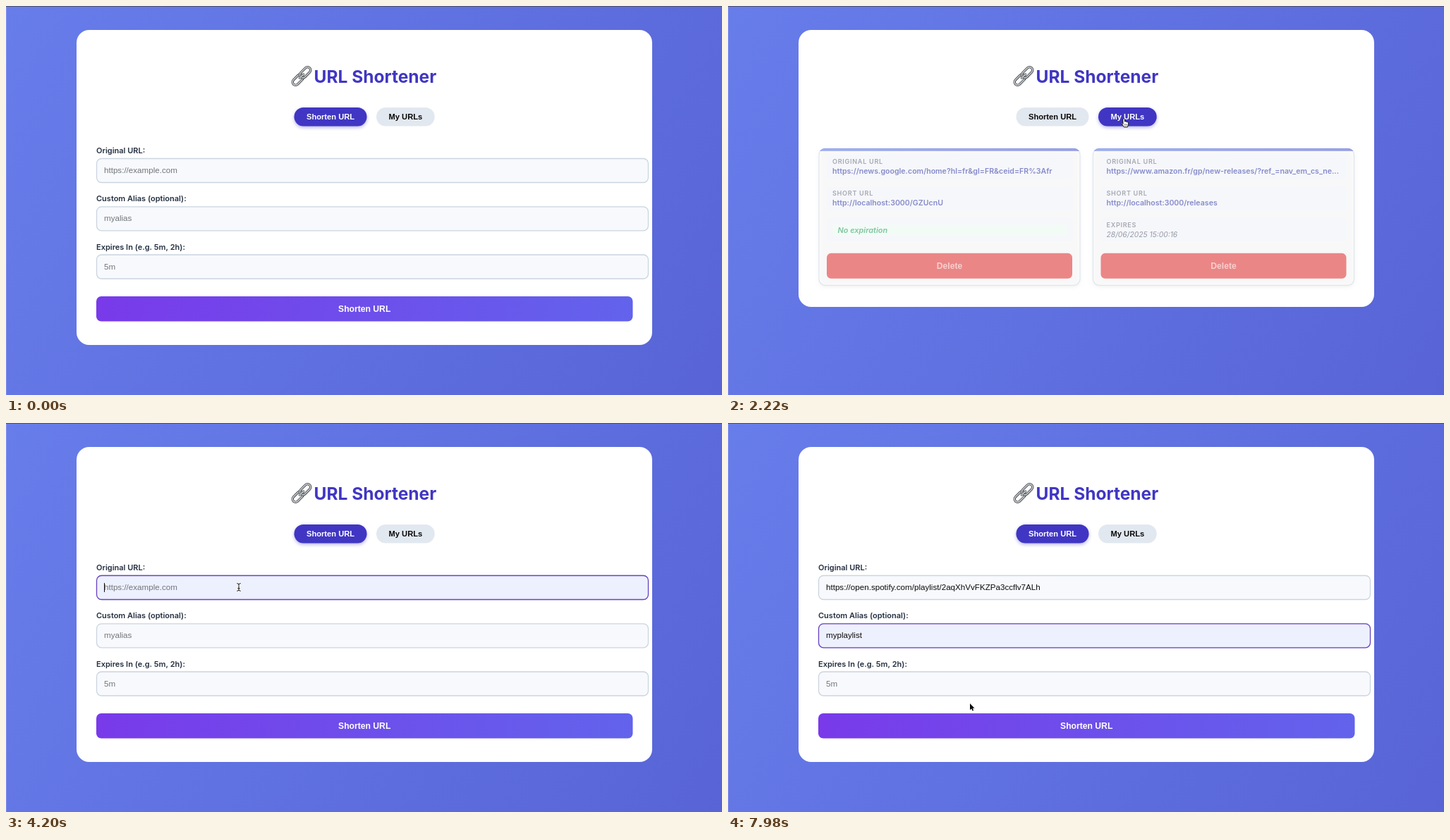
Animation of 1015x552 px, one loop 8 s. Source, as an HTML page with a canvas:

```html
<!DOCTYPE html>
<html lang="en">
<head>
<meta charset="utf-8">
<title>URL Shortener</title>
<style>
  html, body { margin: 0; width: 100%; height: 100%; overflow: hidden; background: #606fe0; }
  canvas { display: block; width: 1015px; height: 552px; }
</style>
</head>
<body>
<canvas id="stage" width="1015" height="552"></canvas>
<script>
const ctx = document.getElementById('stage').getContext('2d');
const LOOP = 8000, STEP = 30;
const SANS = '"Liberation Sans", Arial, sans-serif';
const UI = 'Inter, sans-serif';
const INPUT_FONT = `11.62px ${SANS}`;

const LINK = 'https://open.spotify.com/playlist/2aqXhVvFKZPa3ccflv7ALh';
const ALIAS = 'myplaylist';
const KEY_TIMES = [5610, 5790, 5940, 6000, 6150, 6300, 6750, 6870, 6960, 7170];
const PASTE = 4470, LIST_IN = 1860, LIST_OUT = 3210;
const CLICKS = [1350, 1800, 3210, 4020, 5160];

// Pointer hot spot: time, x, y
const PATH = [
  [30, 582, 545], [330, 556, 112], [390, 552, 95], [480, 550, 119],
  [660, 550, 119], [900, 556, 157], [1170, 556, 157], [1320, 570, 231],
  [1410, 570, 231], [1620, 567, 160], [2190, 567, 160], [2580, 492, 154],
  [2730, 487, 154], [3000, 486, 154], [3480, 486, 154], [3960, 330, 233],
  [4680, 330, 233], [4980, 324, 300.5], [7200, 324, 300.5],
  [7950, 336, 391.5], [7980, 343, 398]
];

const clamp = v => Math.max(0, Math.min(1, v));
const ramp = (t, from, to) => clamp((t - from) / (to - from));
const smooth = p => p * p * (3 - 2 * p);
const mix = (a, b, p) => a + (b - a) * p;

function box(x, y, w, h, r, fill, stroke, line = 1.3) {
  ctx.beginPath();
  ctx.roundRect(x, y, w, h, r);
  if (fill) { ctx.fillStyle = fill; ctx.fill(); }
  if (stroke) { ctx.strokeStyle = stroke; ctx.lineWidth = line; ctx.stroke(); }
}

function label(str, x, y, font, color, align = 'left', spacing = 0) {
  ctx.font = font;
  ctx.fillStyle = color;
  ctx.textAlign = align;
  ctx.letterSpacing = spacing + 'px';
  ctx.fillText(str, x, y);
  ctx.letterSpacing = '0px';
}

function gradient(x0, y0, x1, y1, from, to) {
  const g = ctx.createLinearGradient(x0, y0, x1, y1);
  g.addColorStop(0, from);
  g.addColorStop(1, to);
  return g;
}

function layer(alpha, draw) {
  if (alpha <= 0) return;
  ctx.save();
  ctx.globalAlpha *= alpha;
  draw();
  ctx.restore();
}

function shadow(color, blur, dy, draw) {
  ctx.save();
  ctx.shadowColor = color;
  ctx.shadowBlur = blur;
  ctx.shadowOffsetY = dy;
  draw();
  ctx.restore();
}

function drawBackground() {
  ctx.fillStyle = gradient(0, 0, 982, 612, '#677dea', '#5864d6');
  ctx.fillRect(0, 0, 1015, 552);
  ctx.fillStyle = 'rgba(255,255,255,.18)';
  ctx.fillRect(0, 0, 1, 552);
  ctx.fillStyle = '#4b4f6c';
  ctx.fillRect(0, 0, 1015, 1);
}

function drawChain() {
  ctx.save();
  ctx.translate(419, 99.5);
  ctx.rotate(-Math.PI / 4);
  for (const x of [-16.3, -1.7]) {
    box(x, -4.3, 18, 8.6, 4.3, null, '#3f4246', 3.4);
    box(x, -4.3, 18, 8.6, 4.3, null, '#a9adb1', 1.9);
    box(x, -4.6, 18, 8.6, 4.3, null, '#e4e6e8', 0.7);
  }
  box(-5, -1.2, 10, 2.4, 1.2, '#c6c9cc', '#45484c', 0.8);
  ctx.restore();
}

function drawTab(str, x, w, active) {
  const textX = x + w / 2;
  const font = `bold 11.13px ${SANS}`;
  box(x, 144, w, 26.5, 13.2, '#e2e8f0');
  label(str, textX, 161, font, '#080808', 'center');
  layer(active, () => {
    shadow('rgba(64,54,195,.38)', 5, 2, () => box(x, 144, w, 26.5, 13.2, '#4036c3'));
    label(str, textX, 161, font, '#fff', 'center');
  });
}

function drawField(name, y, value, hint, focus, caret) {
  label(name, 128, y - 7, `600 11px ${UI}`, '#242f40');
  box(128.5, y + 0.5, 782, 34, 7, '#f7f9fc', '#cbd5e0');
  layer(focus, () => box(128.5, y + 0.5, 782, 34, 7, '#edf0fd', '#6a43c4'));
  label(value || hint, 139, y + 21, INPUT_FONT, value ? '#0c0c0c' : '#72757a');
  if (caret) {
    ctx.fillStyle = '#111';
    ctx.fillRect(139 + (value ? ctx.measureText(value).width : 0), y + 11, 1, 13);
  }
}

function drawForm(t) {
  const focusLink = t < LIST_IN
    ? ramp(t, 1350, 1560)
    : ramp(t, 4020, 4200) * (1 - ramp(t, 5175, 5340));
  const typed = ALIAS.slice(0, KEY_TIMES.filter(k => t >= k).length);
  drawField('Original URL:', 216, t >= PASTE ? LINK : '', 'https://example.com',
    focusLink, t >= 4050 && t < 5160);
  drawField('Custom Alias (optional):', 284.3, typed, 'myalias',
    ramp(t, 5175, 5340), t >= 5170 && t < 7500);
  drawField('Expires In (e.g. 5m, 2h):', 352.5, '', '5m', 0, false);
  box(128, 412, 760.5, 35.5, 7, gradient(128, 0, 888, 0, '#793aea', '#6263ec'));
  label('Shorten URL', 508.2, 434, `bold 12.15px ${SANS}`, '#fff', 'center');
}

function drawEntry(x, url, short, expires) {
  const caption = (str, y) => label(str, x + 19.5, y, `600 9.1px ${UI}`, '#737780', 'left', 0.7);
  const link = (str, y) => label(str, x + 19.5, y, `600 10.6px ${UI}`, '#3f45a8');

  shadow('rgba(0,0,0,.1)', 5, 2, () => box(x + 0.5, 199.5, 370, 194, 9, '#fff'));
  box(x + 0.5, 199.5, 370, 194, 9, null, '#d3dcea');
  ctx.save();
  ctx.beginPath();
  ctx.roundRect(x, 199, 371, 194.5, 9);
  ctx.clip();
  ctx.fillStyle = gradient(x, 0, x + 371, 0, '#667eea', '#5a67d8');
  ctx.fillRect(x, 199, 371, 4);
  ctx.restore();

  for (const y of [207.5, 252.3, 297]) box(x + 11.5, y, 349, 35, 6, '#f5f7fe');
  caption('ORIGINAL URL', 221.3);
  link(url, 234.7);
  caption('SHORT URL', 266.3);
  link(short, 279.7);
  if (expires) {
    caption('EXPIRES', 310.7);
    label(expires, x + 19.5, 325, `italic 10.3px ${UI}`, '#566072');
  } else {
    box(x + 19.5, 307.5, 333, 16, 3, '#f0fff4');
    label('No expiration', x + 27, 319.3, `italic 600 10.9px ${UI}`, '#38a169');
  }
  box(x + 11.5, 348, 348, 36, 6, '#e33d3d');
  label('Delete', x + 185.5, 370.4, `bold 12.15px ${SANS}`, '#fff', 'center');
}

function drawList(t) {
  const p = smooth(ramp(t, LIST_IN, LIST_IN + 630));
  layer(p, () => {
    ctx.translate(0, 7.3 * (1 - p));
    drawEntry(128.5, 'https://news.google.com/home?hl=fr&gl=FR&ceid=FR%3Afr',
      'http://localhost:3000/GZUcnU');
    drawEntry(517, 'https://www.amazon.fr/gp/new-releases/?ref_=nav_em_cs_ne...',
      'http://localhost:3000/releases', '28/06/2025 15:00:16');
  });
}

const ARROW = new Path2D('M0 0V9.2L2.1 7.3L3.6 10.4L5.1 9.7L3.8 6.7H6.5Z');
const HAND = new Path2D('M-1.3 7.5V1Q0-.9 1.3 1V4.5Q2.6 3.6 3.4 4.9Q4.7 4.2 5.2 5.5' +
  'Q6.5 5.2 6.5 6.6L6.2 9.2L5.2 12.2H0L-1.5 9.8L-3.6 7.2Q-3.2 5.4-1.3 7.5Z');
const BEAM = new Path2D('M-2.4-5.3Q0-5.3 0-4Q0-5.3 2.4-5.3M0-4V4M-2.4 5.3Q0 5.3 0 4Q0 5.3 2.4 5.3M-1.3 1.7H1.3');

function strokePath(path, color, width) {
  ctx.strokeStyle = color;
  ctx.lineWidth = width;
  ctx.stroke(path);
}

function pointerAt(t) {
  const next = PATH.findIndex(k => k[0] > t);
  if (next < 0) return PATH[PATH.length - 1].slice(1);
  const a = PATH[next - 1], b = PATH[next];
  const p = ramp(t, a[0], b[0]);
  return [mix(a[1], b[1], p), mix(a[2], b[2], p)];
}

function pointerKind(x, y, listShown) {
  const within = (l, top, r, bottom) => x > l && x < r && y > top && y < bottom;
  if (within(408, 144, 512, 171) || within(525, 144, 608, 171)) return 'hand';
  if (listShown) return 'arrow';
  if (within(128, 412, 889, 448)) return 'hand';
  return [216, 284, 352].some(top => within(128, top, 911, top + 35)) ? 'beam' : 'arrow';
}

function drawPointer(t, listShown) {
  const hidden = t < 30 || (t >= PASTE && t < 4680) || (t >= 5640 && t < 7200);
  if (hidden) return;
  const [x, y] = pointerAt(t);
  ctx.save();
  ctx.translate(x, y);
  ctx.lineJoin = ctx.lineCap = 'round';
  if (CLICKS.some(c => t >= c && t < c + 90)) {
    ctx.beginPath();
    ctx.arc(0, 0, 11.3, 0, 2 * Math.PI);
    ctx.fillStyle = 'rgba(255,255,255,.6)';
    ctx.fill();
    ctx.strokeStyle = '#111';
    ctx.lineWidth = 1.6;
    ctx.stroke();
  }
  const kind = pointerKind(x, y, listShown);
  if (kind === 'beam') {
    strokePath(BEAM, '#fff', 2.4);
    strokePath(BEAM, '#111', 1);
  } else if (kind === 'hand') {
    ctx.fillStyle = '#fff';
    ctx.fill(HAND);
    strokePath(HAND, '#111', 1);
    strokePath(new Path2D('M1.1 8V10M2.8 8V10M4.5 8V10'), '#333', 0.6);
  } else {
    strokePath(ARROW, '#fff', 1.8);
    ctx.fillStyle = '#080808';
    ctx.fill(ARROW);
  }
  ctx.restore();
}

function render(t) {
  const listShown = t >= LIST_IN && t < LIST_OUT;
  const listTab = ramp(t, 1800, 2010) * (1 - ramp(t, LIST_OUT, 3420));
  drawBackground();
  box(100, 34, 816, listShown ? 393 : 447, 18, '#fff');
  drawChain();
  label('URL Shortener', 436.5, 108.6, `700 24.5px ${UI}`, '#4036c3');
  drawTab('Shorten URL', 408.5, 103, 1 - listTab);
  drawTab('My URLs', 525, 82.7, listTab);
  if (listShown) drawList(t); else drawForm(t);
  drawPointer(t, listShown);
}

function tick() {
  const t = performance.now() % LOOP;
  render(Math.floor(t / STEP) * STEP);
  requestAnimationFrame(tick);
}
tick();
</script>
</body>
</html>
```
